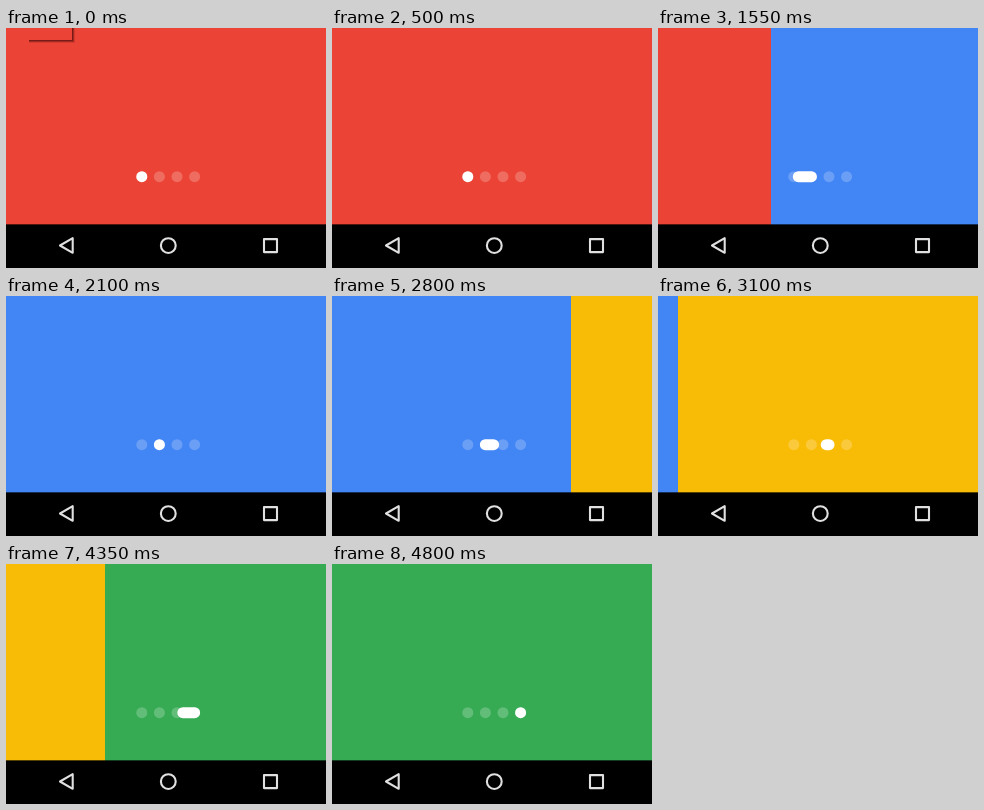
Animation, 320 px wide and 240 px high, one loop 5550 ms. Source, as an HTML page with a canvas:

```html
<!DOCTYPE html>
<html lang="en">
<head>
<meta charset="utf-8">
<title>Page indicator</title>
<style>
html, body { margin: 0; width: 100%; height: 100%; overflow: hidden; background: #000; }
canvas { display: block; }
</style>
</head>
<body>
<canvas id="stage" width="320" height="240"></canvas>
<script>
const ctx = document.getElementById('stage').getContext('2d');
const LOOP = 5550, STEP = 50, WIDTH = 320, BAR_TOP = 197;
const LAG = 10; // the indicator trails the page slightly
const DOT = { x: 135.8, y: 148.7, gap: 17.6, r: 5.5 };
const colors = ['#eb4335', '#4285f4', '#f9bc06', '#36ab54'];
const swipes = [
  { start: 950, duration: 920 },
  { start: 2550, duration: 632 },
  { start: 3910, duration: 647 }
];

const clamp = v => Math.max(0, Math.min(1, v));

// Smoothstep with a slightly slower start
function ease(u) {
  const v = clamp(u) ** 1.2;
  return v * v * (3 - 2 * v);
}

// Scroll position counted in pages, 0 to 3
const scrollAt = t => swipes.reduce((sum, s) => sum + ease((t - s.start) / s.duration), 0);

function rect(color, x, y, w, h) {
  ctx.fillStyle = color;
  ctx.fillRect(x, y, w, h);
}

function pill(left, right, color) {
  ctx.fillStyle = color;
  ctx.beginPath();
  ctx.roundRect(left - DOT.r, DOT.y - DOT.r, right - left + 2 * DOT.r, 2 * DOT.r, DOT.r);
  ctx.fill();
}

function drawPages(scroll) {
  const page = Math.floor(scroll);
  rect(colors[page], 0, 0, WIDTH, BAR_TOP);
  const edge = Math.round((1 - scroll + page) * WIDTH);
  if (edge < WIDTH) rect(colors[page + 1], edge, 0, WIDTH - edge, BAR_TOP);
}

function drawIndicator(scroll) {
  const place = i => DOT.x + i * DOT.gap;
  for (let i = 0; i < 4; i++) pill(place(i), place(i), 'rgba(255,255,255,.22)');
  const page = Math.floor(scroll), part = scroll - page;
  // The leading end moves in the first half, the trailing end in the second
  pill(place(page + clamp(part * 2 - 1)), place(page + clamp(part * 2)), '#fff');
}

function drawTooltip(t) {
  const fade = 1 - clamp((t - 300) / 200);
  if (!fade) return;
  ctx.globalAlpha = fade;
  for (let i = 0; i < 3; i++) {
    const shade = `rgba(40,0,0,${.6 - i * .24})`;
    rect(shade, 66 + i, 0, 1, 12 + i);
    rect(shade, 23, 12 + i, 44 + i, 1);
  }
  ctx.globalAlpha = fade * clamp((t - 50) / 150);
  rect('#767676', 17, 0, 49, 12);
  rect('#fff', 18, 0, 47, 11);
  ctx.globalAlpha = 1;
}

function drawBar() {
  rect('#000', 0, BAR_TOP, WIDTH, 240 - BAR_TOP);
  rect('rgba(0,0,0,.65)', 0, BAR_TOP - 1, WIDTH, 1);
  ctx.strokeStyle = '#e0e0e0';
  ctx.lineWidth = 2.1;
  ctx.lineJoin = 'round';
  ctx.stroke(new Path2D('M54 217.5L66.7 210.2V224.8ZM258 211.1h13v13h-13Z'));
  ctx.beginPath();
  ctx.arc(162.3, 217.6, 7.4, 0, 2 * Math.PI);
  ctx.stroke();
}

function draw() {
  const t = Math.floor(performance.now() % LOOP / STEP) * STEP;
  drawPages(scrollAt(t));
  drawTooltip(t);
  drawIndicator(scrollAt(t - LAG));
  drawBar();
  requestAnimationFrame(draw);
}
draw();
</script>
</body>
</html>
```
